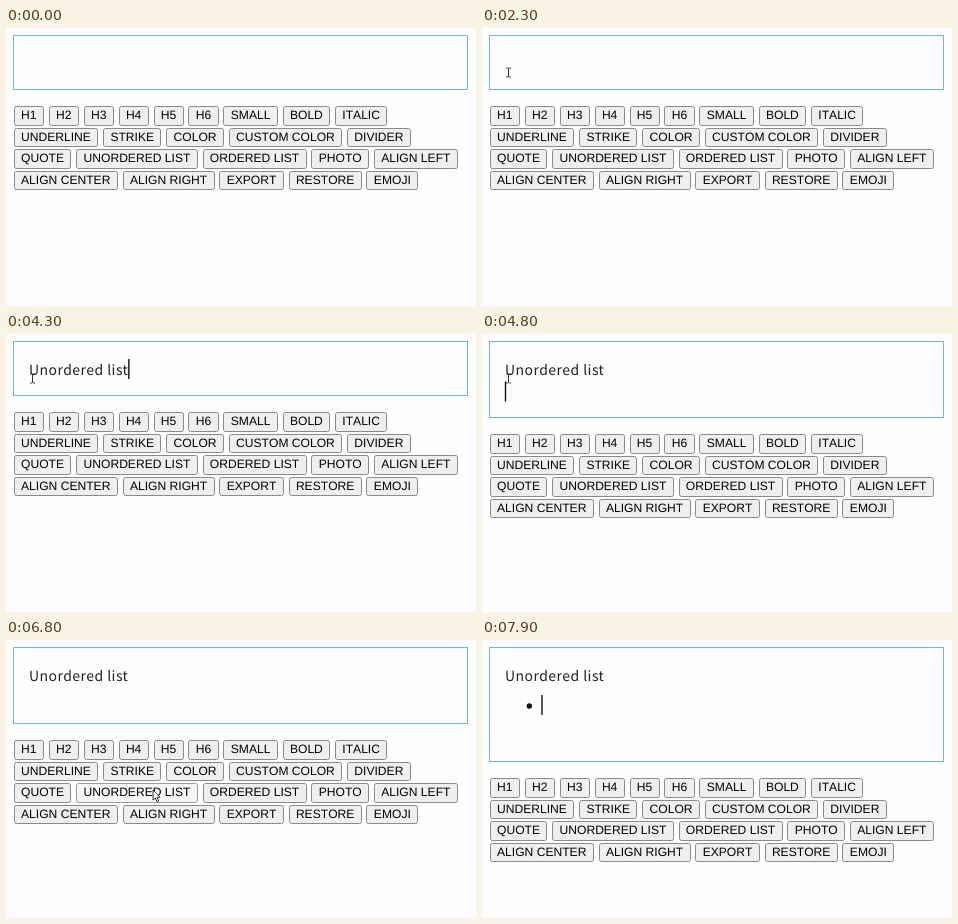
Animation of 470 by 278 pixels, one loop 8000 ms. Source, as an HTML page:

```html
<!DOCTYPE html>
<html lang="en">
<head>
<meta charset="utf-8">
<style>
html, body { margin: 0; width: 100%; height: 100%; overflow: hidden; background: #fdfcfe; }
#bar { position: absolute; left: 7.7px; }
.row { display: flex; gap: 4.8px; height: 19.5px; margin-bottom: 2px; }
.row span {
  box-sizing: border-box; padding: 0 6.35px; border: 1px solid #8a8a8a; border-radius: 2.5px;
  background: #efefef; color: #000; white-space: pre;
  font: 12.1px/17.5px "Liberation Sans", Arial, sans-serif; font-kerning: none; text-rendering: geometricPrecision;
}
.row .hover { background: #e5e5e5; }
.row .down { background: #f6f6f6; border-color: #9c9c9c; }
svg { position: absolute; left: 0; top: 0; pointer-events: none; }
#text { font: 14px "Noto Sans CJK KR", "Noto Sans CJK", "Noto Sans", sans-serif; letter-spacing: .45px; fill: #222; text-rendering: geometricPrecision; }
</style>
</head>
<body>
<div id="bar"></div>
<svg width="470" height="278" fill="none">
  <rect id="editor" x="7.5" y="7.5" width="454" stroke="#6fbcb8"/>
  <text id="text" x="23" y="40.6"></text>
  <circle id="bullet" cx="47.3" cy="66" r="2.7" fill="#111"/>
  <rect id="caret" width="1.4" height="20" fill="#111"/>
  <g id="mouse">
    <path id="beam" d="M-2.5-4.5H-1L0-4L1-4.5H2.5M0-4V4M-2.5 4.5H-1L0 4L1 4.5H2.5" stroke="#333"/>
    <path id="arrow" d="M0 0V10L2.3 8L4 11.7L5.7 11L4 7.3H7Z" fill="#fff" stroke="#222" stroke-width=".9"/>
  </g>
</svg>
<script>
const $ = id => document.getElementById(id);
const show = (id, on) => $(id).style.display = on ? "" : "none";

const rows = [
  "H1,H2,H3,H4,H5,H6,SMALL,BOLD,ITALIC",
  "UNDERLINE,STRIKE,COLOR,CUSTOM COLOR,DIVIDER",
  "QUOTE,UNORDERED LIST,ORDERED LIST,PHOTO,ALIGN LEFT",
  "ALIGN CENTER,ALIGN RIGHT,EXPORT,RESTORE,EMOJI"
];
$("bar").innerHTML = rows.map(row =>
  `<div class="row">${row.split(",").map(label => `<span>${label}</span>`).join("")}</div>`).join("");
const buttons = [...document.querySelectorAll(".row span")];

const PHRASE = "Unordered list";
const FOCUS = 700, TYPE = 2400, KEY = 125, ENTER = 4650, PRESS = 6700, LIST = 6880;
const path = [ // time, x, y
  [0, -20, 44.5], [600, -20, 44.5], [900, 26.5, 44.5], [5500, 26.5, 44.5], [6000, 123.5, 85],
  [6500, 147, 150], [6950, 147, 150], [7200, 150, 300], [8000, 150, 300]
];

function mouseAt(t) {
  const i = path.findIndex(p => p[0] > t);
  const [t0, x0, y0] = path[i - 1], [t1, x1, y1] = path[i];
  const k = (t - t0) / (t1 - t0), e = k * k * (3 - 2 * k);
  return [x0 + (x1 - x0) * e, y0 + (y1 - y0) * e];
}

function caretOn(t, typed) {
  if (t < FOCUS || (t >= PRESS && t < LIST)) return false;
  const lastKey = TYPE + typed * KEY;
  const since = t >= LIST ? LIST : t >= ENTER ? ENTER : typed ? lastKey : FOCUS;
  return (t - since) % 1000 < 500;
}

function draw(t) {
  const grow = t < ENTER ? 0 : t < LIST ? 22.4 : 60;
  const bottom = Math.floor(61 + grow) + .5;
  $("editor").setAttribute("height", bottom - 7.5);
  $("bar").style.top = 78 + grow + "px";

  const typed = Math.max(0, Math.min(PHRASE.length, Math.floor((t - TYPE) / KEY)));
  const text = $("text");
  text.textContent = PHRASE.slice(0, typed);
  show("bullet", t >= LIST);
  show("caret", caretOn(t, typed));
  const end = typed ? text.getComputedTextLength() : 0;
  const [cx, cy] = t >= LIST ? [59.3, 55] : t >= ENTER ? [22.8, 47.5] : [22.8 + end, 25];
  $("caret").setAttribute("x", cx);
  $("caret").setAttribute("y", cy);

  const [x, y] = mouseAt(t), outside = y > bottom + 3;
  $("mouse").setAttribute("transform", `translate(${x} ${y})`);
  show("beam", !outside);
  show("arrow", outside);
  const hit = outside && document.elementFromPoint(x, y);
  const pressed = t >= PRESS && t < LIST;
  for (const b of buttons) b.className = b !== hit ? "" : pressed ? "down" : "hover";
}

function tick() {
  draw(performance.now() % 8000);
  requestAnimationFrame(tick);
}
tick();
</script>
</body>
</html>
```
